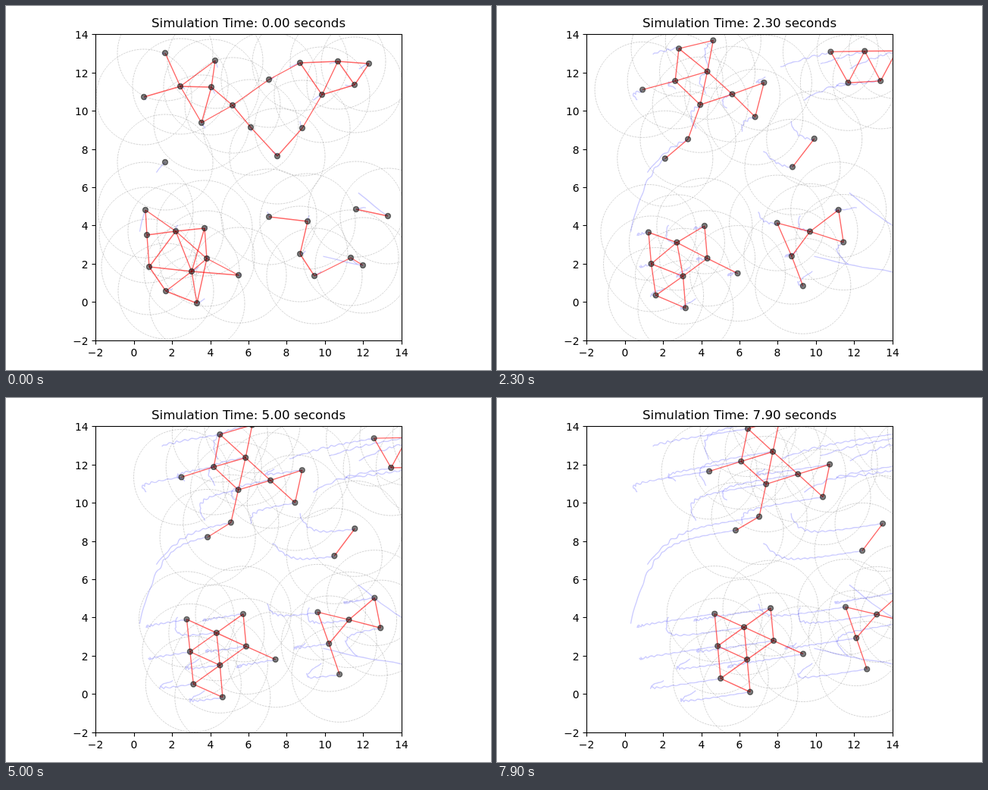
These frames come from a looping animation (640 by 480 pixels, 8 s). An HTML page with a canvas:

```html
<!DOCTYPE html>
<html lang="en">
<head>
<meta charset="utf-8">
<title>Flocking simulation</title>
<style>
  html, body { margin: 0; width: 100%; height: 100%; overflow: hidden; background: #fff; }
  canvas { display: block; width: 640px; height: 480px; }
</style>
</head>
<body>
<canvas id="stage" width="640" height="480"></canvas>
<script>
const ctx = document.getElementById('stage').getContext('2d');
const FONT = '"DejaVu Sans", sans-serif';
const UNIT = 25.2, RANGE = 63;
const STEP = 0.1, FRAMES = 80, LEAD = 4;
const CRUISE = { x: 17.1, y: -2.65 };   // final flock speed in px per second
const SETTLE = 1.25;                    // seconds to relax into formation
const agents = [];

let seed = 11;
function rand() {
  seed = (seed * 16807) % 2147483647;
  return seed / 2147483647;
}

// Travel relative to t = 5 s, in seconds at cruise speed
function travel(t) {
  const lag = s => 0.6 * Math.exp((2.3 - s) / 1.5);
  return t - 5 + lag(t) - lag(5);
}

// Fading random sway, zero at t = 0
function makeSway(speed) {
  const f = 6.28 * (speed + rand() * 0.6), phase = rand() * 6.28;
  return t => 2.4 * Math.exp(-t / 2.8) * (1 - Math.exp(-2 * Math.abs(t))) * Math.sin(f * t + phase);
}

// One agent leaves its start and relaxes into its moving place
function agent(start, place) {
  const swayX = makeSway(0.9), swayY = makeSway(1.2);
  const along = (axis, t) => place[axis] + CRUISE[axis] * travel(t) +
    (start[axis] - place[axis] - CRUISE[axis] * travel(0)) * Math.exp(-t / SETTLE);
  agents.push(Array.from({ length: FRAMES + LEAD }, (_, k) => {
    const t = (k - LEAD) * STEP;
    return [along('x', t) + 0.7 * swayX(t), along('y', t) + swayY(t)];
  }));
}

// Formation at t = 5 s is a lattice: origin + i * a + j * b.
// Members: start x, start y, lattice i, lattice j
function flock([ox, oy], [ax, ay], [bx, by], members) {
  for (const [x, y, i, j] of members) {
    agent({ x, y }, { x: ox + i * ax + j * bx, y: oy + i * ay + j * by });
  }
}

// Upper left
flock([316, 78], [42, -13], [-9, 43], [
  [210, 62, -1, -1], [276, 72, 0, -1], [271, 107, 0, 0], [230, 106, -1, 0],
  [182, 120, -2, 0], [258, 154, 0, 1], [299, 131, 1, 1], [347, 97, 2, 1],
  [323, 160, 2, 2], [210, 206, 0, 2], [184, 269, -0.7, 2.2]
]);
// Upper right
flock([487, 53], [43.5, -1], [22, 39], [
  [388, 75, 0, 0], [438, 73, 1, 0], [479, 76, 2, 0], [417, 117, 0, 1], [460, 104, 1, 1]
]);
// Middle pair
flock([434, 209], [27, -36], [0, 0], [[358, 198, 0, 0], [391, 161, 1, 0]]);
// Lower left
flock([239, 292], [39, 17.7], [4, 42.7], [
  [186, 302, 0, 0], [189, 344, 0, 1], [211, 376, 0, 2], [224, 297, 1, 0], [245, 350, 1, 1],
  [252, 392, 1, 2], [262, 293, 2, -1], [265, 333, 2, 0], [307, 355, 3, 0]
]);
// Lower right
flock([412, 283], [41, 10], [14, 41], [
  [347, 278, 0, 0], [398, 284, 1, 0], [388, 327, 0, 1],
  [407, 356, 0, 2], [455, 332, 2, 0], [462, 268, 2.15, -1]
]);
// Two that leave on the right
agent({ x: 471, y: 342 }, { x: 670, y: 360 });
agent({ x: 504, y: 277 }, { x: 670, y: 345 });

function line(pts) {
  ctx.beginPath();
  for (const [x, y] of pts) ctx.lineTo(x, y);
  ctx.stroke();
}

function disc(x, y, r) {
  ctx.beginPath();
  ctx.arc(x, y, r, 0, 2 * Math.PI);
}

function pen(color, width, dash = []) {
  ctx.strokeStyle = color;
  ctx.lineWidth = width;
  ctx.setLineDash(dash);
}

function drawAxes() {
  pen('#000', 1.11);
  ctx.strokeRect(118.5, 37.5, 404, 404);
  ctx.fillStyle = '#000';
  ctx.font = '13.89px ' + FONT;
  for (let v = -2; v <= 14; v += 2) {
    const x = Math.round(168.8 + UNIT * v) + 0.5;
    const y = 479.5 - Math.round(88.8 + UNIT * v);
    const label = String(v).replace('-', '\u2212');
    line([[x, 442], [x, 446.5]]);
    line([[118, y], [113.5, y]]);
    ctx.textAlign = 'center';
    ctx.fillText(label, x - 0.5, 462);
    ctx.textAlign = 'right';
    ctx.fillText(label, 108.7, y + 5.5);
  }
}

function draw(n) {
  const now = agents.map(p => p[n + LEAD]);
  ctx.fillStyle = '#fff';
  ctx.fillRect(0, 0, 640, 480);

  ctx.save();
  ctx.beginPath();
  ctx.rect(118.4, 38, 403.4, 403.4);
  ctx.clip();
  ctx.lineJoin = 'round';

  pen('rgba(128,128,128,0.5)', 0.69, [2.57, 1.11]);
  for (const [x, y] of now) {
    disc(x, y, RANGE);
    ctx.stroke();
  }

  pen('rgba(0,0,255,0.2)', 1.39);
  for (const p of agents) line(p.slice(0, n + LEAD + 1));

  pen('rgba(255,0,0,0.6)', 1.39);
  now.forEach((a, i) => {
    for (const b of now.slice(i + 1)) {
      if (Math.hypot(a[0] - b[0], a[1] - b[1]) < RANGE) line([a, b]);
    }
  });

  pen('rgba(0,0,0,0.5)', 1.39);
  ctx.fillStyle = 'rgba(0,0,0,0.5)';
  for (const [x, y] of now) {
    disc(x, y, 3.47);
    ctx.fill();
    ctx.stroke();
  }
  ctx.restore();

  drawAxes();
  ctx.textAlign = 'center';
  ctx.font = '16.67px ' + FONT;
  ctx.fillText(`Simulation Time: ${(n * STEP).toFixed(2)} seconds`, 320, 28);
}

let start = null;
function tick(now) {
  if (start === null) start = now;
  draw(Math.floor(Math.max(0, now - start) / 100 + 1e-4) % FRAMES);
  requestAnimationFrame(tick);
}
draw(0);
requestAnimationFrame(tick);
</script>
</body>
</html>
```
